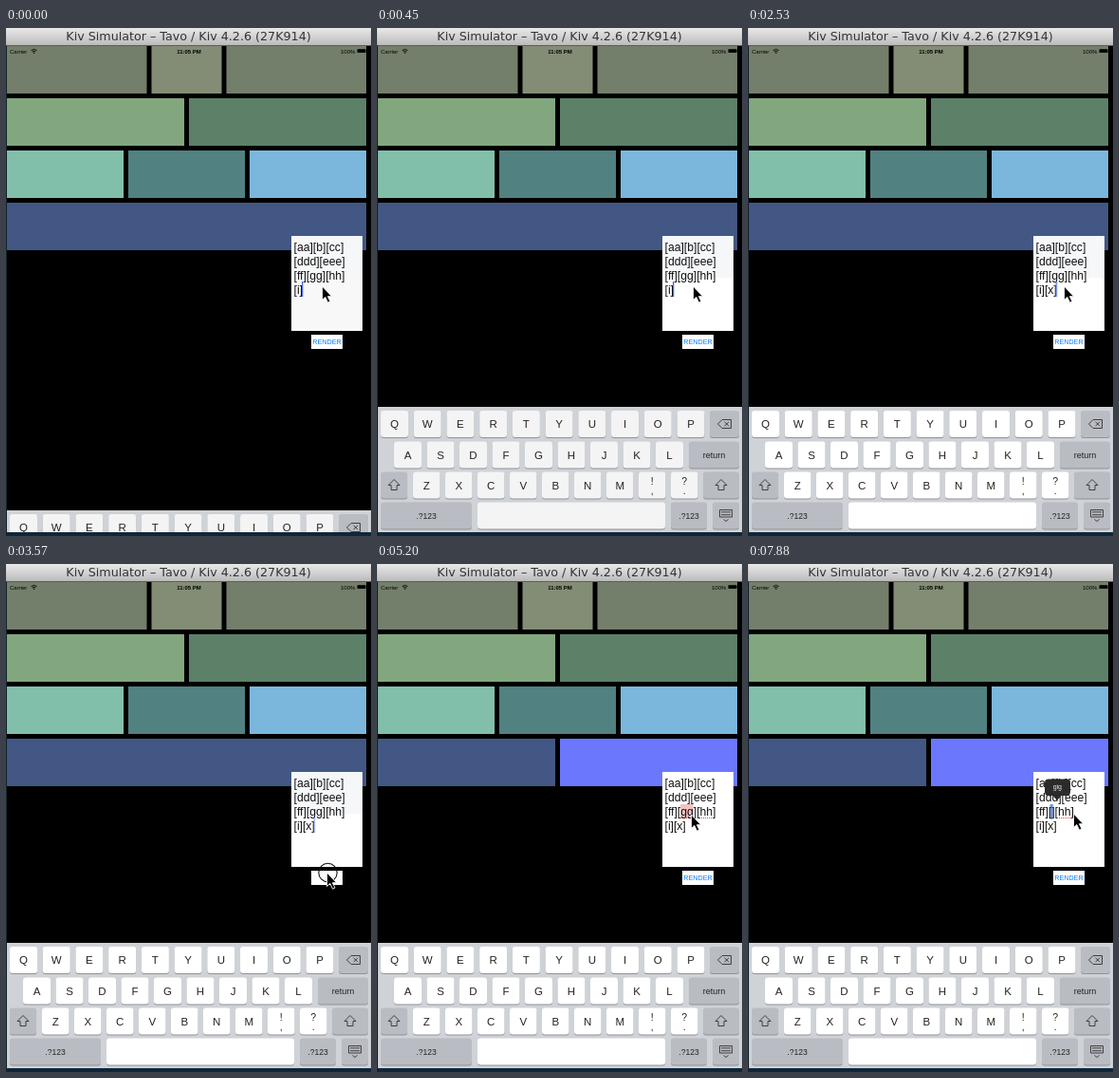
An HTML page for the animation above (8 s loop, 385 px wide and 535 px high).

```html
<!DOCTYPE html>
<html lang="en">
<head>
<meta charset="utf-8">
<title>Tablet layout demo</title>
<style>
html, body { margin: 0; width: 100%; height: 100%; overflow: hidden; background: #000; }
svg { display: block; width: 385px; height: 535px; font-family: "Liberation Sans", Arial, sans-serif; }

/* Every change is a hard step on one 8 s clock */
.a { animation: 8s step-end -4ms infinite; }

#board { animation-name: rise; }
@keyframes rise {
  0% { transform: translateY(109px); }
  1.875% { transform: translateY(38px); }
  3.75% { transform: translateY(6px); }
  5.625%, 100% { transform: none; }
}
.key { fill: #fff; animation-name: keyTone; }
@keyframes keyTone { 0% { fill: #f4f4f4; } 7.5%, 100% { fill: #fff; } }
.dark { fill: #b9bcc2; }

#paperTop { animation-name: topTone; }
@keyframes topTone { 0% { fill: #f6f7f9; } 46.375%, 100% { fill: #fff; } }
#paperLow { animation-name: lowTone; }
@keyframes lowTone { 0% { fill: #f8f8f9; } 1.875%, 100% { fill: #fff; } }

#open { animation-name: typeOpen; }
@keyframes typeOpen { 0% { opacity: 0; } 13.125%, 100% { opacity: 1; } }
#x { animation-name: typeX; }
@keyframes typeX { 0% { opacity: 0; } 29.75%, 100% { opacity: 1; } }
#close { animation-name: typeClose; }
@keyframes typeClose { 0% { opacity: 0; } 31.625%, 100% { opacity: 1; } }

#caret { animation-name: caret; }
@keyframes caret {
  0% { transform: translate(312px, 267px); opacity: 1; }
  13.125% { transform: translate(315px, 267px); opacity: 1; }
  20.5% { transform: translate(315px, 267px); opacity: .1; }
  22.375% { transform: translate(315px, 267px); opacity: 0; }
  26% { transform: translate(315px, 267px); opacity: .6; }
  27.875% { transform: translate(315px, 267px); opacity: 1; }
  29.75% { transform: translate(321px, 267px); opacity: 1; }
  31.625% { transform: translate(324.5px, 267px); opacity: 1; }
  44.625% { transform: translate(324.5px, 267px); opacity: .6; }
  52% { transform: translate(324.5px, 267px); opacity: .3; }
  53.875% { transform: translate(324.5px, 267px); opacity: 0; }
  98.5%, 100% { transform: translate(319.5px, 253px); opacity: 1; }
}

#label { animation-name: press; }
@keyframes press {
  0% { opacity: 1; }
  42.875% { opacity: .3; }
  44.625% { opacity: .06; }
  46.375% { opacity: .6; }
  48.25%, 100% { opacity: 1; }
}
#wide { animation-name: split; }
@keyframes split { 0% { opacity: 1; } 46.375%, 100% { opacity: 0; } }

#misspelt { animation-name: spell; }
@keyframes spell { 0% { opacity: 0; } 65% { opacity: 1; } 98.5%, 100% { opacity: 0; } }
#full { animation-name: full; }
@keyframes full { 0% { opacity: 1; } 98.5%, 100% { opacity: 0; } }
#cut { animation-name: cut; }
@keyframes cut { 0% { opacity: 0; } 98.5%, 100% { opacity: 1; } }

#bubble { animation-name: bubble; }
@keyframes bubble {
  0% { opacity: 0; }
  89.375% { opacity: .4; }
  91.125% { opacity: .8; }
  93%, 100% { opacity: 1; }
}

#mouse { animation-name: move; }
@keyframes move {
  0% { transform: translate(333px, 272px); }
  37.25% { transform: translate(334px, 281px); }
  39.125% { transform: translate(336px, 302px); }
  41% { transform: translate(338px, 320px); }
  42.875% { transform: translate(338px, 325px); }
  48.25% { transform: translate(335px, 309px); }
  50.125% { transform: translate(331px, 281px); }
  52% { transform: translate(331px, 269px); }
  53.875% { transform: translate(331px, 264px); }
  91.125% { transform: translate(336px, 264px); }
  93%, 100% { transform: translate(343px, 263px); }
}
#ring { animation-name: tap; }
@keyframes tap {
  0% { opacity: 0; }
  44.625% { opacity: 1; }
  46.375% { opacity: 0; }
  57.625% { opacity: 1; }
  59.375% { opacity: 0; }
  85.625% { opacity: 1; }
  87.5%, 100% { opacity: 0; }
}

.note { font-size: 12.2px; fill: #111; }
.wave { stroke: #e0443c; stroke-width: 1; stroke-dasharray: 1 1; }
.icon { fill: none; stroke: #333; stroke-width: .9; stroke-linejoin: round; }
</style>
</head>
<body>
<svg viewBox="0 0 385 535">
  <defs>
    <linearGradient id="bar" x2="0" y2="1">
      <stop stop-color="#e9e9e9"/><stop offset="1" stop-color="#bababa"/>
    </linearGradient>
  </defs>
  <rect width="385" height="535"/>

  <g id="tiles"></g>
  <rect id="wide" class="a" x="1" y="184" width="379" height="50" fill="#425783"/>

  <g font-size="6" fill="#000">
    <text x="4" y="26.5">Carrier</text>
    <text x="193" y="26.5" text-anchor="middle" font-weight="bold">11:05 PM</text>
    <text x="353" y="26.5">100%</text>
    <path d="M26.5 23.6q3-2.4 6 0M27.7 25q1.8-1.4 3.6 0" fill="none" stroke="#000" stroke-width=".9"/>
    <circle cx="29.5" cy="26.3" r=".7"/>
    <rect x="370.5" y="22.3" width="9" height="3.8" rx=".6"/>
  </g>

  <rect width="385" height="18.5" fill="url(#bar)"/>
  <text x="192.5" y="13.3" text-anchor="middle" font-size="12.7" fill="#333"
    style="font-family:'DejaVu Sans',sans-serif">Kiv Simulator – Tavo / Kiv 4.2.6 (27K914)</text>

  <rect id="paperLow" class="a" x="301" y="262" width="75" height="57"/>
  <rect id="paperTop" class="a" x="301" y="219" width="75" height="44"/>
  <g id="misspelt" class="a">
    <rect x="320" y="253" width="13.5" height="15" fill="#f5c0c2"/>
    <path class="wave" d="M320 267.5h13.5M340 267.5h13.5"/>
  </g>
  <g class="note">
    <text x="303.5" y="235">[aa][b][cc]</text>
    <text x="303.5" y="250">[ddd][eee]</text>
    <text id="full" class="a" x="303.5" y="265">[ff][gg][hh]</text>
    <g id="cut" class="a">
      <rect x="318" y="253" width="4.5" height="15" fill="#b4caf0"/>
      <text x="303.5" y="265">[ff][][hh]</text>
      <path class="wave" d="M326 267.5h17"/>
    </g>
    <text x="303.5" y="280">[i]</text>
    <text id="open" class="a" x="312.9" y="280">[</text>
    <text id="x" class="a" x="316.2" y="280">x</text>
    <text id="close" class="a" x="322.3" y="280">]</text>
  </g>
  <rect id="caret" class="a" width="1.3" height="16" fill="#3f63e0"/>

  <rect x="322" y="323" width="33" height="15" fill="#fff"/>
  <text id="label" class="a" x="338.5" y="333.2" text-anchor="middle" font-size="7.2" fill="#007aff">RENDER</text>

  <g id="bubble" class="a">
    <path d="M317 226.5h19q4 0 4 4v9.500q0 4-4 4h-5.500l-4.500 5-4.500-5H317q-4 0-4-4v-9.500q0-4 4-4z" fill="#2b2b2b"/>
    <text x="326.300" y="237" text-anchor="middle" font-size="7" fill="#eee">gig</text>
  </g>

  <g id="board" class="a">
    <rect x="1" y="399" width="384" height="136" fill="#cfd2d7"/>
  </g>
  <rect y="531" width="385" height="4" fill="#10263a"/>
  <rect y="18.5" width="1" height="516.5" fill="#14222f"/>

  <g id="mouse" class="a">
    <circle id="ring" class="a" cx="1.500" cy="0" r="9.700" fill="none" stroke="#111" stroke-width="1.100"/>
    <path d="M.5 0V14.500l3.300-3 2.700 5.700 2.500-1.200-2.600-5.300h4.300z" fill="#000" stroke="#fff" stroke-width=".9"/>
  </g>
</svg>
<script>
const make = (parent, tag, attrs, text) => {
  const el = document.createElementNS("http://www.w3.org/2000/svg", tag);
  for (const name in attrs) el.setAttribute(name, attrs[name]);
  if (text) el.textContent = text;
  return parent.appendChild(el);
};

// Tiles: each row is its top, then [left, right, colour]
const tiles = document.getElementById("tiles");
const rows = [
  [19, [1, 148.5, "#747f6b"], [153.5, 227.5, "#838d75"], [232.5, 380, "#747f6b"]],
  [74, [1, 188, "#82a77e"], [193, 380, "#5c8168"]],
  [129, [1, 124, "#82bfaa"], [129, 252, "#518181"], [257, 380, "#7bb7dd"]],
  [184, [1, 188, "#425783"], [193, 380, "#6b78fd"]]
];
for (const [y, ...cells] of rows)
  for (const [x, right, fill] of cells)
    make(tiles, "rect", { x, y, width: right - x, height: 50, fill });

// Keyboard
const board = document.getElementById("board");
const key = (x, y, width, text = "", dark = false, size = 11.5) => {
  const box = { x, width, height: 28, rx: 3 };
  make(board, "rect", { ...box, y: y + 1, fill: "#8f9297" });
  make(board, "rect", { ...box, y, class: dark ? "dark" : "key a" });
  make(board, "text", {
    x: x + width / 2, y: y + 14 + size * 0.37, "text-anchor": "middle", "font-size": size, fill: "#222"
  }, text);
};
const run = (letters, x, y, pitch, width) =>
  [...letters].forEach((c, i) => key(x + i * pitch, y, width, c));
const icon = d => make(board, "path", { d, class: "icon" });

run("QWERTYUIOP", 4, 403, 34.72, 29);
key(351, 403, 31, "", true);
run("ASDFGHJKL", 18, 435.5, 34.5, 29);
key(329, 435.5, 53, "return", true, 9);
key(4, 467.5, 28, "", true);
run("ZXCVBNM", 38, 467.5, 34, 28.5);
for (const [x, top, low] of [[276, "!", ","], [310, "?", "."]]) {
  key(x, 467.5, 28.5);
  for (const [c, y] of [[top, 481], [low, 491]])
    make(board, "text", { x: x + 14.2, y, "text-anchor": "middle", "font-size": 10.5, fill: "#222" }, c);
}
key(344, 467.5, 38, "", true);
key(4, 499.5, 96, ".?123", true, 8.5);
key(106, 499.5, 198);
key(310, 499.5, 38, ".?123", true, 8.5);
key(354, 499.5, 28, "", true);

icon("M359.500 417l4.500-4.500h9.500v9H364zM366.500 414.700l4.600 4.600m0-4.600l-4.600 4.600");
for (const x of [18, 363]) icon(`M${x} 475.500l6 6h-3v5h-6v-5h-3z`);
icon("M361.500 507.500h13v7.500h-13zM363 509.800h10M363 512.700h10M365.500 517.500l2.500 2 2.500-2")
  .setAttribute("stroke-dasharray", "60 0");
</script>
</body>
</html>
```
